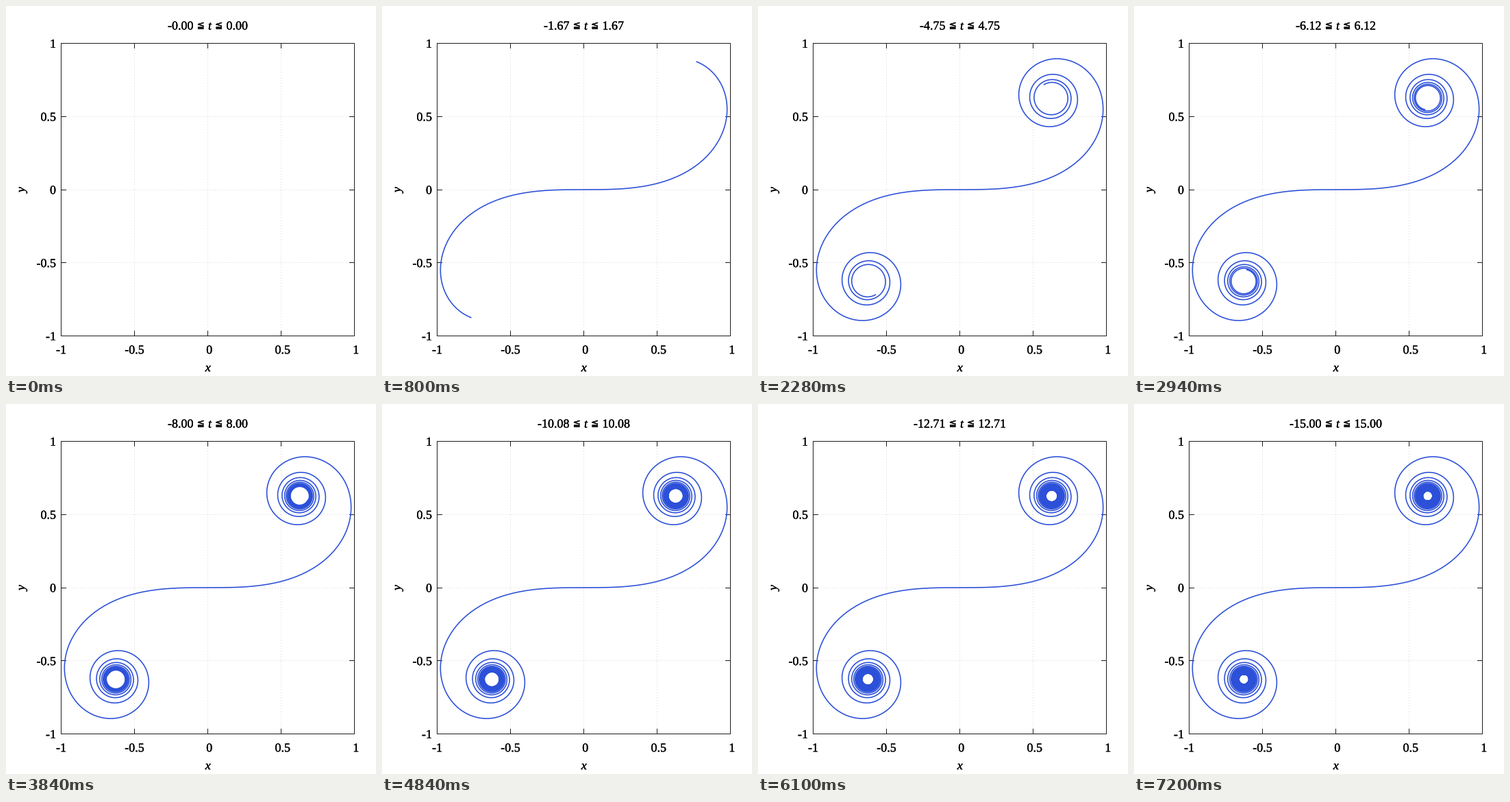
These frames come from a looping animation (540 px wide and 540 px high, 7.22 s). A matplotlib script:

```python
import numpy as np
import matplotlib.pyplot as plt
from matplotlib.animation import FuncAnimation
from matplotlib.patheffects import withStroke

SIZE, FRAMES, T_MAX = 540, 361, 15.0
SUB = 24                                # curve samples per frame
LEFT, RIGHT, TOP, BOTTOM = 80.5, 508.5, 54.5, 481.5
CX, CY = (LEFT + RIGHT) / 2, (TOP + BOTTOM) / 2
INK, BLUE, GRID = "#1c1c1c", "#2c50d8", "#d2d2d2"

plt.rcParams.update({
    "font.family": "Liberation Serif",
    "font.size": 18,
    "text.hinting": "no_hinting",
    "axes.unicode_minus": False,
})

# One unit of the axes is one pixel, with y pointing down.
fig = plt.figure(figsize=(SIZE / 72, SIZE / 72), dpi=72, facecolor="white")
ax = fig.add_axes([0, 0, 1, 1])
ax.set_xlim(0, SIZE)
ax.set_ylim(SIZE, 0)
ax.axis("off")


def px(x):
    return CX + (RIGHT - LEFT) / 2 * x


def py(y):
    return CY - (BOTTOM - TOP) / 2 * y


def crisp(v):
    """Centre of the pixel that holds v."""
    return np.floor(v) + 0.5


def stroke(xs, ys, color=INK, width=1.0, **kw):
    return ax.plot(xs, ys, color=color, lw=width, snap=False, **kw)[0]


def label(x, y, text, ha="center", weight=0.3, **kw):
    heavier = [withStroke(linewidth=weight, foreground="black")]
    return ax.text(x, y, text, ha=ha, va="baseline", rotation_mode="anchor",
                   path_effects=heavier, **kw)


# Fresnel integrals of cos(s^2) and sin(s^2) by the midpoint rule
ds = T_MAX / ((FRAMES - 1) * SUB)
mid = (np.arange((FRAMES - 1) * SUB) + 0.5) * ds
fx = np.concatenate([[0], np.cumsum(np.cos(mid ** 2)) * ds])
fy = np.concatenate([[0], np.cumsum(np.sin(mid ** 2)) * ds])

for v in (-0.5, 0, 0.5):
    gx, gy = crisp(px(v)), crisp(py(v))
    dots = dict(color=GRID, zorder=1, linestyle=(0, (1, 3)), dash_capstyle="butt")
    stroke([gx, gx], [BOTTOM, TOP], **dots)
    stroke([LEFT, RIGHT], [gy, gy], **dots)
    for edge, inward in ((LEFT, 7), (RIGHT, -7)):
        stroke([edge, edge + inward], [gy, gy], zorder=2)
    for edge, inward in ((TOP, 7), (BOTTOM, -7)):
        stroke([gx, gx], [edge, edge + inward], zorder=2)

stroke([LEFT, RIGHT, RIGHT, LEFT, LEFT], [TOP, TOP, BOTTOM, BOTTOM, TOP],
       zorder=2, solid_joinstyle="miter", solid_capstyle="projecting")

for v in (-1, -0.5, 0, 0.5, 1):
    sign_gap = 2.25 if v >= 0 else 0    # half a blank in place of the minus
    label(px(v) + sign_gap, 507.4, f"{v:g}")
    label(73, py(v) + 6.3, f"{v:g}", ha="right")

label(CX + 0.3, 533.2, "x", style="italic")
label(27.2, CY, "y", style="italic", rotation=90)

T_X, TITLE_Y = 297.5, 34.4
label(T_X, TITLE_Y, "t", style="italic")
for dx in (-13.25, 13.25):
    label(T_X + dx, TITLE_Y - 2, "\u2266", family="DejaVu Sans", size=13.5)
low = label(T_X - 24, TITLE_Y, "", ha="right")
high = label(T_X + 24, TITLE_Y, "", ha="left")

curve = stroke([], [], BLUE, 1.6, zorder=3, solid_joinstyle="round",
               solid_capstyle="butt")


def update(i):
    t = T_MAX * i / (FRAMES - 1)
    n = i * SUB + 1
    xs = np.concatenate([-fx[n - 1:0:-1], fx[:n]])
    ys = np.concatenate([-fy[n - 1:0:-1], fy[:n]])
    curve.set_data(px(xs), py(ys))
    low.set_text(f"-{t:.2f}")
    high.set_text(f"{t:.2f}")
    return curve, low, high


anim = FuncAnimation(fig, update, frames=FRAMES, init_func=lambda: update(0),
                     interval=20, repeat=True, repeat_delay=0, blit=False)
plt.show()
```
